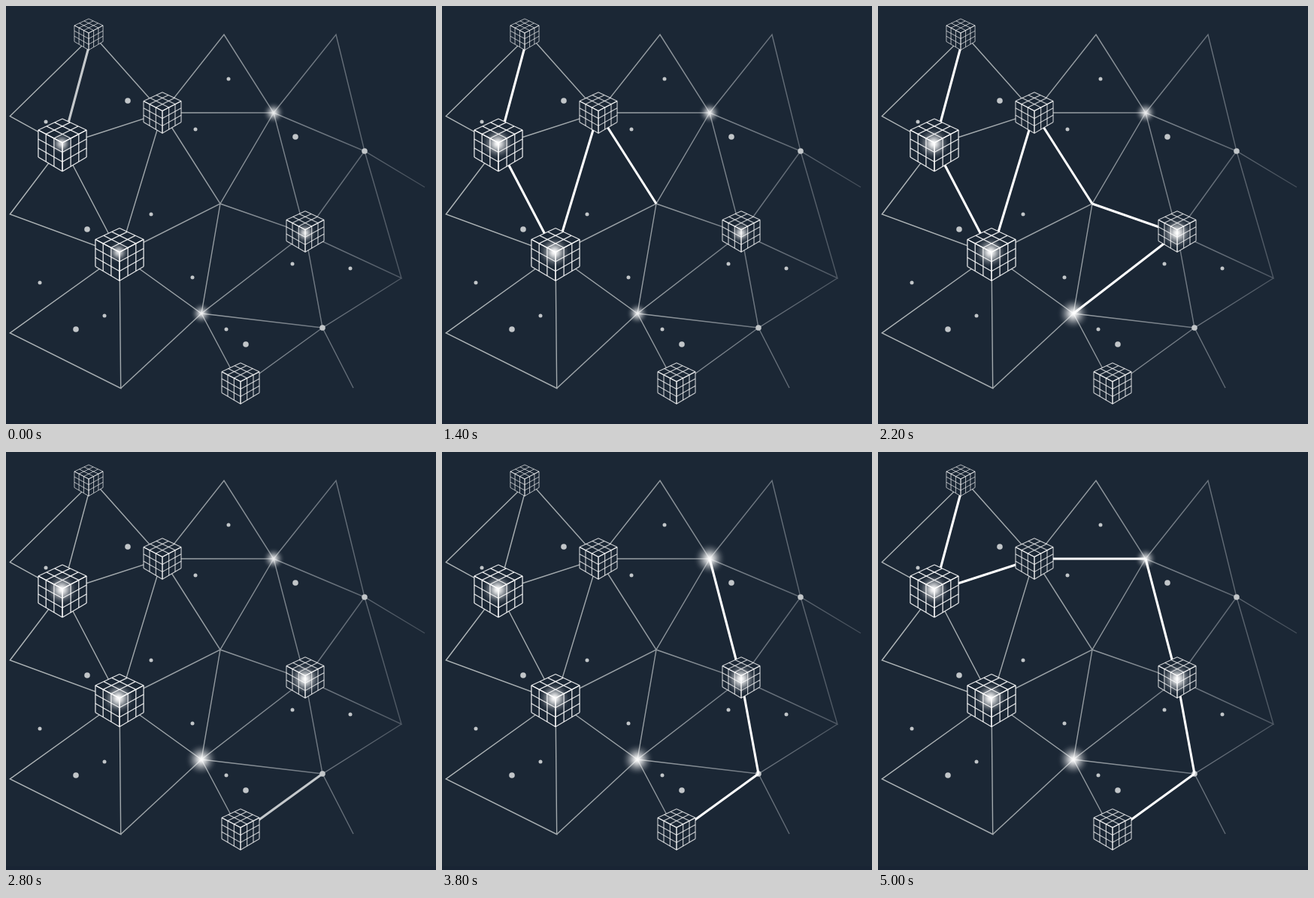
Write an HTML page with a canvas that moves like this. It is 572 px wide and 556 px high and loops after 5200 ms.

```html
<!DOCTYPE html>
<html lang="en">
<head>
<meta charset="utf-8">
<title>Network</title>
<style>
html, body { margin: 0; width: 100%; height: 100%; overflow: hidden; background: #1b2735; }
canvas { display: block; }
</style>
</head>
<body>
<canvas id="stage" width="572" height="556"></canvas>
<script>
const ctx = document.getElementById("stage").getContext("2d");
const W = 572, H = 556, BG = "#1b2735";
const STEP = 200, STEPS = 26, SECOND_LEG = 7, BLINK = 3;

// Cube nodes are a to f; the top cube has one anchor for each side.
const nodes = {
  a: [110, 44], a2: [110, 32], a3: [114.5, 38], b: [75, 185], c: [151, 330.5], d: [208, 142],
  e: [398, 302.5], f: [312, 507], g: [285, 263], h: [260, 409], i: [356, 142],
  j: [477, 193], k: [421, 428], l: [526, 362], m: [5.3, 146.5], n: [5.3, 277],
  o: [5.3, 435], p: [152.7, 508.5], q: [290, 38], r: [439, 38], s: [557, 241], t: [462, 508]
};
const paths = ("a-m-b-n-c-o-p-c-d-g-c-b-d-q-i-g-h-c h-p a3-b a2-d-i-r-j-i-e-g " +
  "f-h-e-j-s j-l-e-k-f h-k-l k-t").split(" ");
const route = "a3-b b-c c-d d-g g-e e-h h-f f-k k-e e-i i-d d-b a3-b".split(" ");

// node, shift from the node to the cube centre, scale
const cubes = [
  ["a", -6.2, 0.594], ["b", 0, 1], ["c", 0, 1],
  ["d", 0, 0.78], ["e", -2.5, 0.78], ["f", -5, 0.78]
];
// node, shift, first lit step, first dark step
const glows = [
  ["b", -2, 1], ["c", -3, 3], ["e", -0.5, 9], ["h", 0, 11], ["i", 0, 19, 22]
];
const bigDots = [[162, 126], [385, 174], [108, 297], [93, 430], [319, 450], nodes.j, nodes.k];
const smallDots = [
  [53, 154], [252, 164], [296, 97], [193, 277], [45, 368],
  [131, 412], [248, 361], [293, 430], [381, 343], [458, 349]
];

function trace(points) {
  ctx.beginPath();
  for (const point of points) ctx.lineTo(...point);
}

function stroke(path) {
  trace(path.split("-").map(name => nodes[name]));
  ctx.stroke();
}

function disc([x, y], r) {
  ctx.beginPath();
  ctx.arc(x, y, r, 0, Math.PI * 2);
  ctx.fill();
}

function drawNet() {
  const fade = ctx.createLinearGradient(0, 0, W, 0);
  fade.addColorStop(0, "#b2b8ba");
  fade.addColorStop(0.45, "#989fa4");
  fade.addColorStop(0.75, "#6c757f");
  fade.addColorStop(1, "#3e4854");
  ctx.strokeStyle = fade;
  ctx.lineWidth = 1.4;
  paths.forEach(stroke);
}

function drawRoute(step) {
  if (step === BLINK) return;
  const last = step >> 1;
  const start = last >= SECOND_LEG ? SECOND_LEG : 0;
  ctx.lineWidth = 3.1;
  for (let n = start; n <= last; n++) {
    const entering = n === last && step % 2 === 0;
    ctx.strokeStyle = entering ? "#c5c9cc" : "#fff";
    stroke(route[n]);
  }
}

function drawCube([name, shift, scale]) {
  const [cx, cy] = nodes[name];
  // u and v run back from the near corner, z runs down; far parts shrink.
  const at = (u, v, z) => {
    const size = scale / (1 + 0.06 * (u + v));
    return [cx + 34 * (u - v) * size, cy + shift + (38.2 * z - 17.8 * (u + v)) * size - 3.2 * scale];
  };
  trace([at(0, 0, 1), at(1, 0, 1), at(1, 0, 0), at(1, 1, 0), at(0, 1, 0), at(0, 1, 1)]);
  ctx.fillStyle = BG;
  ctx.fill();
  ctx.strokeStyle = `rgba(255,255,255,${0.4 + 0.48 * scale})`;
  ctx.lineWidth = 0.45 + 0.85 * scale;
  const faces = [(s, t) => at(s, t, 0), (s, t) => at(s, 0, t), (s, t) => at(0, s, t)];
  for (const face of faces) {
    for (let n = 0; n <= 3; n++) {
      const s = n / 3;
      trace([face(s, 0), face(s, 1)]);
      ctx.stroke();
      trace([face(0, s), face(1, s)]);
      ctx.stroke();
    }
  }
}

function drawGlow([name, shift, on, off = STEPS], step) {
  const lit = step >= on && step < off;
  const x = nodes[name][0] + shift / 2, y = nodes[name][1] + shift;
  const r = lit ? 22 : 15, core = lit ? 1 : 0.87;
  const light = ctx.createRadialGradient(x, y, 0, x, y, r);
  for (let n = 0; n <= 8; n++) {
    const alpha = core * (1 + Math.cos(Math.PI * Math.pow(n / 8, 0.8))) / 2;
    light.addColorStop(n / 8, `rgba(255,255,255,${alpha})`);
  }
  ctx.fillStyle = light;
  disc([x, y], r);
}

function draw(time) {
  const step = Math.floor(time / STEP) % STEPS;
  ctx.fillStyle = BG;
  ctx.fillRect(0, 0, W, H);
  ctx.fillStyle = "#192434";
  ctx.fillRect(0, H - 5, W, 5);
  drawNet();
  ctx.fillStyle = "#c2c6c9";
  bigDots.forEach(dot => disc(dot, 3.8));
  smallDots.forEach(dot => disc(dot, 2.5));
  drawRoute(step);
  cubes.forEach(drawCube);
  glows.forEach(glow => drawGlow(glow, step));
}

const begin = performance.now();
function tick() {
  draw(performance.now() - begin);
  requestAnimationFrame(tick);
}
tick();
</script>
</body>
</html>
```
